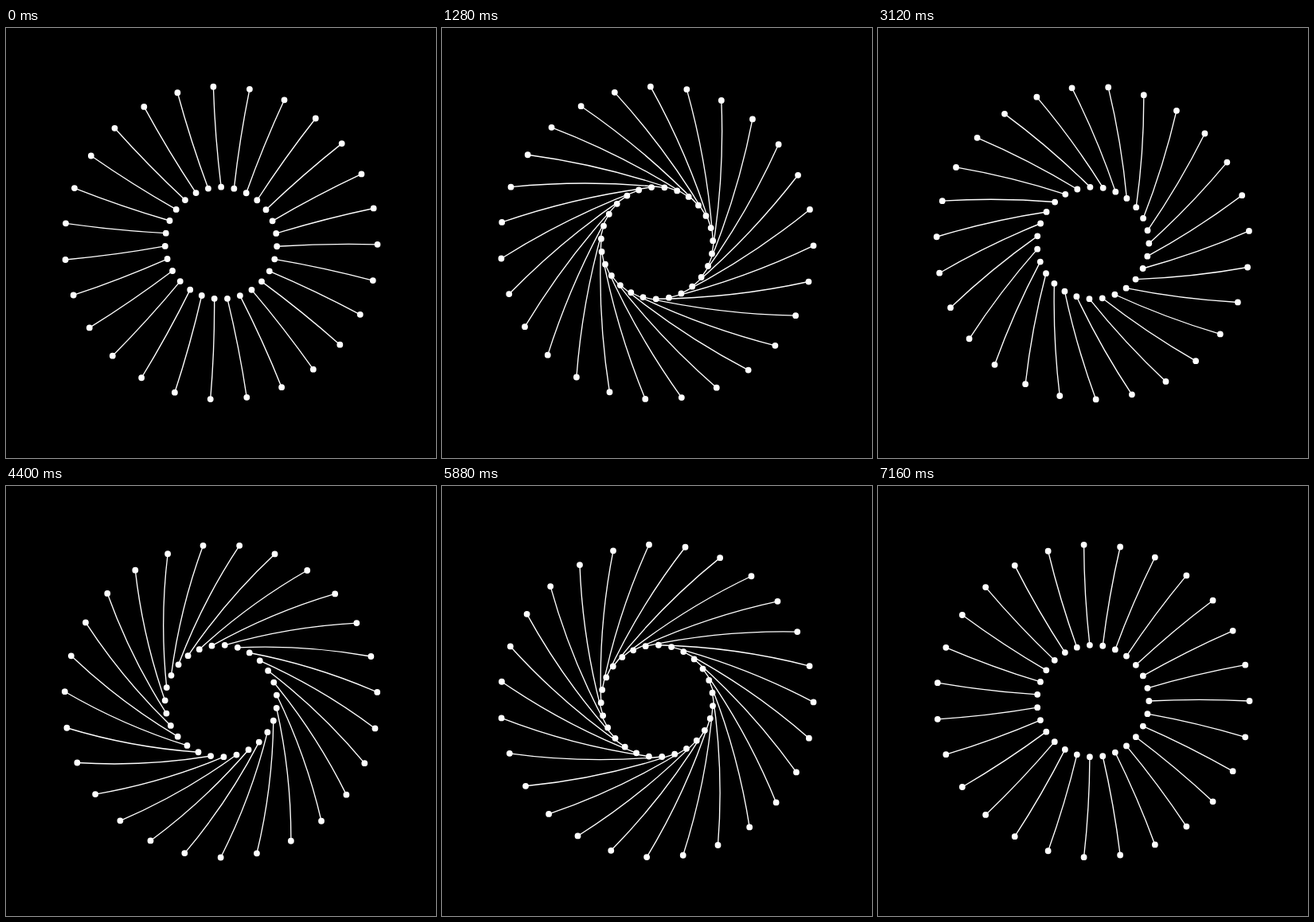
An HTML page for the animation above (7.2 s loop, 540 by 540 pixels).

```html
<!DOCTYPE html>
<html lang="en">
<head>
<meta charset="utf-8">
<title>Twisting spokes</title>
<style>
  html, body { margin: 0; width: 100%; height: 100%; overflow: hidden; background: #000; }
  svg { display: block; width: 100vw; height: 100vh; }
</style>
</head>
<body>
<svg viewBox="0 0 540 540">
  <path id="lines" fill="none" stroke="#fff" stroke-width="1.35"/>
  <path id="dots" fill="none" stroke="#fff" stroke-width="7.8" stroke-linecap="round"/>
</svg>
<script>
const SPOKES = 27, CENTER = 270, INNER = 70.3, OUTER = 196.5;
const LOOP = 7200, STEP = 40;
const TAU = Math.PI * 2;
const SWING = 42 * Math.PI / 180;

const lines = document.getElementById('lines');
const dots = document.getElementById('dots');

const polar = (radius, angle) => [
  CENTER + radius * Math.cos(angle),
  CENTER + radius * Math.sin(angle)
];
const pair = point => point.map(v => v.toFixed(2)).join(' ');

// Control point that pushes the middle of the segment sideways by `bulge`.
function control([ax, ay], [bx, by], bulge) {
  const dx = bx - ax, dy = by - ay;
  const k = 2 * bulge / Math.hypot(dx, dy);
  return [(ax + bx) / 2 - dy * k, (ay + by) / 2 + dx * k];
}

function draw(time) {
  const step = Math.floor((time % LOOP) / STEP);
  const turn = TAU * (step + 1) * STEP / LOOP;
  const swing = SWING * Math.sin(turn);
  const twist = 2 * swing;
  // The bend follows the twist and trails behind the speed of the inner ring.
  const speed = (1 + SWING * Math.cos(turn)) / (1 + SWING);
  const bulge = 5.4 * Math.sin(twist) - 1.7 * speed * Math.cos(twist);

  let linePath = '', dotPath = '';
  for (let i = 0; i < SPOKES; i++) {
    const angle = turn + TAU * i / SPOKES;
    const a = polar(INNER, angle + swing);
    const b = polar(OUTER, angle - swing);
    linePath += `M${pair(a)}Q${pair(control(a, b, bulge))} ${pair(b)}`;
    dotPath += `M${pair(a)}h.01M${pair(b)}h.01`;
  }
  lines.setAttribute('d', linePath);
  dots.setAttribute('d', dotPath);
}

const start = performance.now();
function tick() {
  draw(performance.now() - start);
  requestAnimationFrame(tick);
}
tick();
</script>
</body>
</html>
```
